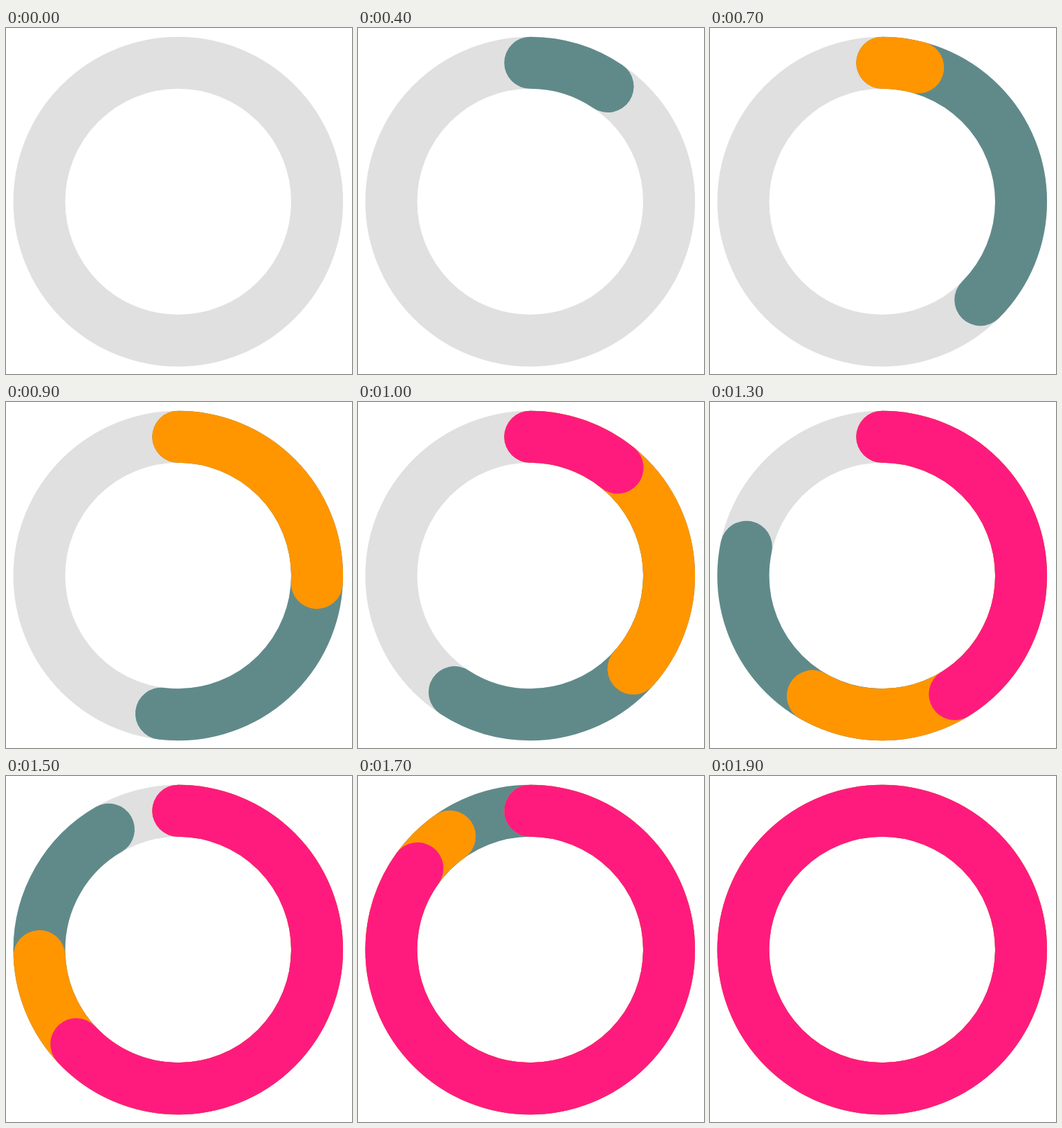
Animation of 500 by 500 pixels, one loop 2 s. Source, as an HTML page with a canvas:

```html
<!DOCTYPE html>
<html lang="en">
<head>
<meta charset="utf-8">
<title>Progress ring</title>
<style>
  html, body { margin: 0; width: 100%; height: 100%; overflow: hidden; background: #fff; }
  canvas { display: block; width: 100vw; height: 100vh; }
</style>
</head>
<body>
<canvas id="stage" width="500" height="500"></canvas>
<script>
const ctx = document.getElementById('stage').getContext('2d');
const LOOP = 2000, TICK = 100, SPAN = 300;
const CX = 248.8, CY = 251, RADIUS = 200.75, WIDTH = 75;

// Sweep in degrees, starting at `begin` and given once per SPAN.
const arcs = [
  { color: '#608a8a', begin: 400, sweep: [34, 135, 213, 282, 354] },
  { color: '#ff9600', begin: 700, sweep: [15, 132, 210, 296] },
  { color: '#ff1b7e', begin: 1000, sweep: [39, 148.5, 266.5] }
];

// Moves evenly between sweeps and keeps the last speed until the ring is full.
function sweepAt({ begin, sweep }, t) {
  if (t < begin) return 0;
  const x = (t - begin) / SPAN;
  const i = Math.min(Math.floor(x), sweep.length - 2);
  return Math.min(360, sweep[i] + (sweep[i + 1] - sweep[i]) * (x - i));
}

function drawArc(color, degrees) {
  if (degrees <= 0) return;
  const top = -Math.PI / 2;
  ctx.beginPath();
  ctx.arc(CX, CY, RADIUS, top, top + degrees * Math.PI / 180);
  ctx.strokeStyle = color;
  ctx.stroke();
}

function draw(now) {
  // The ring advances in discrete ticks.
  const t = Math.floor((now % LOOP) / TICK) * TICK;
  ctx.fillStyle = '#fff';
  ctx.fillRect(0, 0, 500, 500);
  ctx.lineWidth = WIDTH;
  ctx.lineCap = 'round';
  drawArc('#e0e0e0', 360);
  for (const arc of arcs) drawArc(arc.color, sweepAt(arc, t));
}

const start = performance.now();
function frame() {
  draw(performance.now() - start);
  requestAnimationFrame(frame);
}
frame();
</script>
</body>
</html>
```
